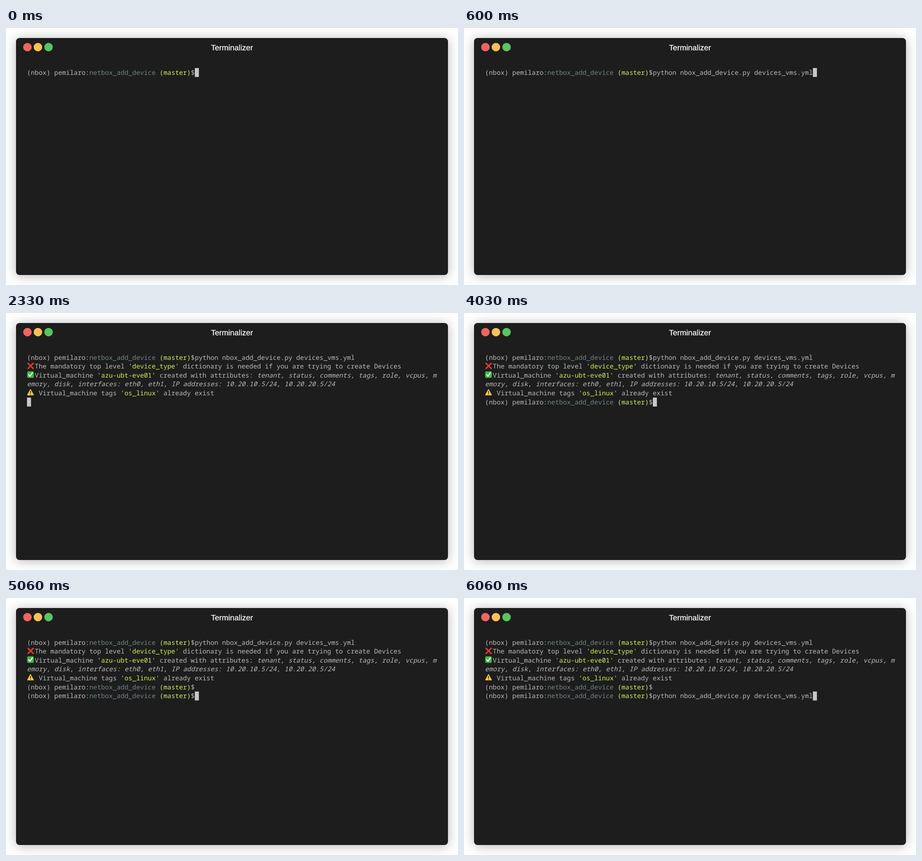
An HTML page for the animation above (8000 ms loop, 991 by 565 pixels).

```html
<!DOCTYPE html>
<html lang="en">
<head>
<meta charset="utf-8">
<title>Terminal session</title>
<style>
  html, body { margin: 0; width: 100%; height: 100%; overflow: hidden; background: #fff; }
  .window {
    position: absolute; left: 22px; top: 22px; width: 947px; height: 521px;
    border-radius: 7.5px; background: #1d1d1d;
    box-shadow: 0 2px 24px rgba(0, 0, 0, .3);
  }
  svg { position: absolute; left: 0; top: 0; display: block; }
  text { white-space: pre; text-rendering: geometricPrecision; }
  .title {
    font: 17.1px "Liberation Sans", Arial, sans-serif;
    fill: #fff; stroke: #fff; stroke-width: .25px; text-anchor: middle;
  }
  .mono { font: 14.263px "Noto Sans Mono", "DejaVu Sans Mono", monospace; fill: #bababa; }
  .path { fill: #708387; }
  .key { fill: #cdf15c; font-weight: 500; }
  .attr { font-style: italic; }

  .cursor, .step { animation: 8s step-end infinite; }
  .cursor { fill: #c7c7c7; animation-name: cursor; }
  .run { animation-name: run; }
  .fail { animation-name: fail; }
  .made { animation-name: made; }
  .prompt2 { animation-name: prompt2; }
  .prompt3 { animation-name: prompt3; }
  .rerun { animation-name: rerun; }

  @keyframes run { 0% { visibility: hidden } 7.5%, 100% { visibility: visible } }
  @keyframes fail { 0% { visibility: hidden } 12.875%, 100% { visibility: visible } }
  @keyframes made { 0% { visibility: hidden } 29.125%, 100% { visibility: visible } }
  @keyframes prompt2 { 0% { visibility: hidden } 50.375%, 100% { visibility: visible } }
  @keyframes prompt3 { 0% { visibility: hidden } 63.25%, 100% { visibility: visible } }
  @keyframes rerun { 0% { visibility: hidden } 75.75%, 100% { visibility: visible } }

  /* one column is 8.558px, one row 19.6px */
  @keyframes cursor {
    0% { transform: translate(368px, 0) }
    7.5% { transform: translate(718.9px, 0) }
    12.5% { transform: translate(0, 19.6px) }
    12.875% { transform: translate(0, 39.2px) }
    29.125% { transform: translate(0, 98px) }
    50.375% { transform: translate(368px, 98px) }
    62.875% { transform: translate(0, 117.6px) }
    63.25% { transform: translate(368px, 117.6px) }
    75.75%, 100% { transform: translate(718.9px, 117.6px) }
  }
</style>
</head>
<body>
<div class="window"></div>
<svg width="991" height="565" viewBox="0 0 991 565">
  <defs>
    <text id="prompt" class="mono">(nbox) pemilaro:<tspan class="path">netbox_add_device</tspan> <tspan class="key">(master)</tspan>$</text>
    <text id="command" class="mono" x="368">python nbox_add_device.py devices_vms.yml</text>
  </defs>

  <circle cx="47" cy="42" r="9.3" fill="#ee6560"/>
  <circle cx="70" cy="42" r="9.3" fill="#f9bf5a"/>
  <circle cx="93.3" cy="42" r="9.3" fill="#58c462"/>
  <text class="title" x="495.5" y="49">Terminalizer</text>

  <g transform="translate(46 102.6)">
    <use href="#prompt"/>
    <use class="step run" href="#command"/>

    <g class="step fail" transform="translate(0 19.6)">
      <path d="M2.4 -11.6L13.6 -.4M13.6 -11.6L2.4 -.4" stroke="#dd3a2a" stroke-width="3.2" stroke-linecap="round"/>
      <text class="mono" x="17.1">The mandatory top level <tspan class="key">'device_type'</tspan> dictionary is needed if you are trying to create Devices</text>
    </g>

    <g class="step made">
      <g transform="translate(0 39.2)">
        <rect x=".5" y="-13.6" width="14.4" height="14.4" rx="2.6" fill="#43b649"/>
        <path d="M3.6 -6.4L6.5 -2.7L11.8 -10.4" fill="none" stroke="#fff" stroke-width="2.2" stroke-linecap="round" stroke-linejoin="round"/>
        <text class="mono" x="17.1">Virtual_machine <tspan class="key">'azu-ubt-eve01'</tspan> created with attributes: <tspan class="attr">tenant, status, comments, tags, role, vcpus, m</tspan></text>
      </g>
      <text class="mono" y="58.4"><tspan class="attr">emory, disk</tspan>, <tspan class="attr">interfaces: eth0, eth1</tspan>, <tspan class="attr">IP addresses: 10.20.10.5/24, 10.20.20.5/24</tspan></text>
      <g transform="translate(0 78.4)">
        <path d="M7.7 -12.6L14 -.9H1.4Z" fill="#fccb3d" stroke="#fccb3d" stroke-width="1.8" stroke-linejoin="round"/>
        <path d="M7.7 -9.2V-4.9M7.7 -2.3V-2.2" stroke="#2a2413" stroke-width="1.7" stroke-linecap="round"/>
        <text class="mono" x="25.7">Virtual_machine tags <tspan class="key">'os_linux'</tspan> already exist</text>
      </g>
    </g>

    <use class="step prompt2" href="#prompt" y="98"/>
    <use class="step prompt3" href="#prompt" y="117.6"/>
    <use class="step rerun" href="#command" y="117.6"/>
  </g>

  <rect class="cursor" x="46" y="88" width="8.9" height="19.6"/>
</svg>
</body>
</html>
```
